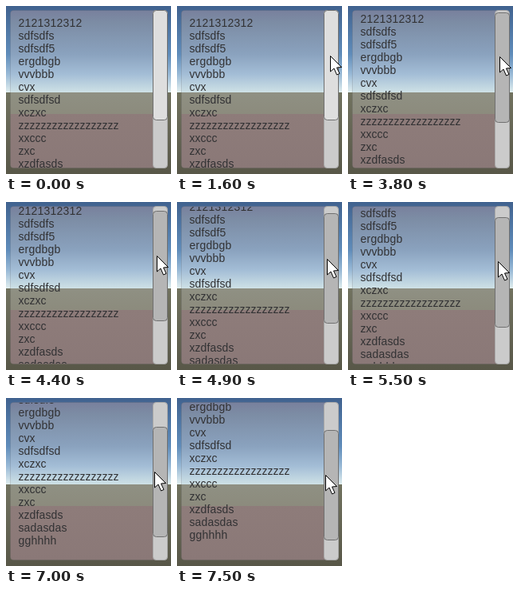
An HTML page with a canvas that plays this animation: 207x210 px, repeating every 8000 ms.

```html
<!DOCTYPE html>
<html lang="en">
<head>
<meta charset="utf-8">
<title>Scroll view</title>
<style>
html, body { margin: 0; width: 100%; height: 100%; overflow: hidden; }
canvas { display: block; width: 100vw; height: 100vh; }
</style>
</head>
<body>
<canvas id="stage" width="207" height="210"></canvas>
<script>
const ctx = document.getElementById('stage').getContext('2d');
const LOOP = 8000;
const LINE_HEIGHT = 16;
const TEXT_PER_HANDLE = 1.655;
const HORIZON = 108.5;
const FONT = '14px "Liberation Sans", Arial, sans-serif';
const lines = ['2121312312', 'sdfsdfs', 'sdfsdf5', 'ergdbgb', 'vvvbbb', 'cvx', 'sdfsdfsd',
  'xczxc', 'z'.repeat(18), 'xxccc', 'zxc', 'xzdfasds', 'sadasdas', 'gghhhh'];

// The screen refreshes every half second, with a few longer pauses
const STEP = 500;
const extraPause = { 0: 100, 5: 200, 7: 100, 9: 100 };
const PRESS_STEP = 5;

const gesture = [
  { step: 1, x: 198, y: 68, offset: 0 },
  { step: 4, x: 190, y: 59, offset: 0 },
  { step: 6, x: 191, y: 59, offset: 0 },
  { step: 9, x: 188, y: 71, offset: 9 },
  { step: 10, x: 188, y: 74, offset: 14 },
  { step: 11, x: 187, y: 83, offset: 23 },
  { step: 14, x: 186, y: 96, offset: 35 }
];

function stepAt(time) {
  let step = 0;
  let end = 0;
  while ((end += STEP + (extraPause[step] || 0)) <= time) step++;
  return step;
}

function poseAt(step) {
  const next = Math.max(1, gesture.findIndex(key => key.step >= step));
  const a = gesture[next - 1];
  const b = gesture[next];
  const t = Math.max(0, (step - a.step) / (b.step - a.step));
  const mix = name => a[name] + (b[name] - a[name]) * t;
  return { x: Math.floor(mix('x')), y: Math.round(mix('y')), offset: mix('offset') };
}

function verticalGradient(stops) {
  const gradient = ctx.createLinearGradient(0, 0, 0, 210);
  for (const [y, color] of stops) gradient.addColorStop(y / 210, color);
  return gradient;
}

const sky = verticalGradient([
  [0, '#40628f'], [60, '#5f8cba'], [85, '#98b9d6'], [HORIZON, '#e2efef'],
  [HORIZON, '#71725f'], [210, '#585748']
]);
const panel = verticalGradient([
  [0, '#777c9a'], [20, '#7c8ca4'], [60, '#8aa2be'], [85, '#a3bdd6'], [HORIZON, '#cfe2e6'],
  [HORIZON, '#8f9083'], [135, '#8c8b7d'], [135, '#8e7c7a'], [210, '#8a7877']
]);

function box(x, y, w, h, fill, stroke) {
  ctx.beginPath();
  ctx.roundRect(x + 0.5, y + 0.5, w - 1, h - 1, 4);
  ctx.fillStyle = fill;
  ctx.fill();
  ctx.strokeStyle = stroke;
  ctx.lineWidth = 1;
  ctx.stroke();
}

// Glyph advances snap to whole pixels
function drawLine(text, x, y) {
  for (const glyph of text) {
    ctx.fillText(glyph, x, y);
    x += Math.round(ctx.measureText(glyph).width);
  }
}

function drawText(shift) {
  ctx.save();
  ctx.beginPath();
  ctx.roundRect(5, 6, 180, 196, 4);
  ctx.clip();
  ctx.font = FONT;
  ctx.fillStyle = '#323234';
  lines.forEach((text, i) => drawLine(text, 15.5, 26 + i * LINE_HEIGHT - shift));
  ctx.restore();
}

function drawPointer(x, y) {
  ctx.save();
  ctx.translate(x + 0.5, y + 0.5);
  ctx.beginPath();
  [[0, 0], [0, 19.5], [4.5, 15.5], [8, 23.5], [11.5, 22], [8, 14.5], [14, 14]]
    .forEach(([px, py]) => ctx.lineTo(px, py));
  ctx.closePath();
  ctx.fillStyle = '#fff';
  ctx.fill();
  ctx.strokeStyle = '#000';
  ctx.lineWidth = 1;
  ctx.stroke();
  ctx.restore();
}

function draw(time) {
  const step = stepAt(time);
  const { x, y, offset } = poseAt(step);
  const handleColor = step >= PRESS_STEP ? '#b5b5b5' : '#dedede';
  ctx.fillStyle = sky;
  ctx.fillRect(0, 0, 207, 210);
  box(5, 5, 198, 198, panel, 'rgba(90,90,95,.2)');
  drawText(Math.round(offset * TEXT_PER_HANDLE));
  box(184, 5, 19, 198, '#cbcbcb', '#a8a8a8');
  box(184, 5 + Math.round(offset), 19, 138, handleColor, '#707070');
  if (step > 0) drawPointer(x, y);
}

function tick() {
  draw(performance.now() % LOOP);
  requestAnimationFrame(tick);
}
tick();
</script>
</body>
</html>
```
